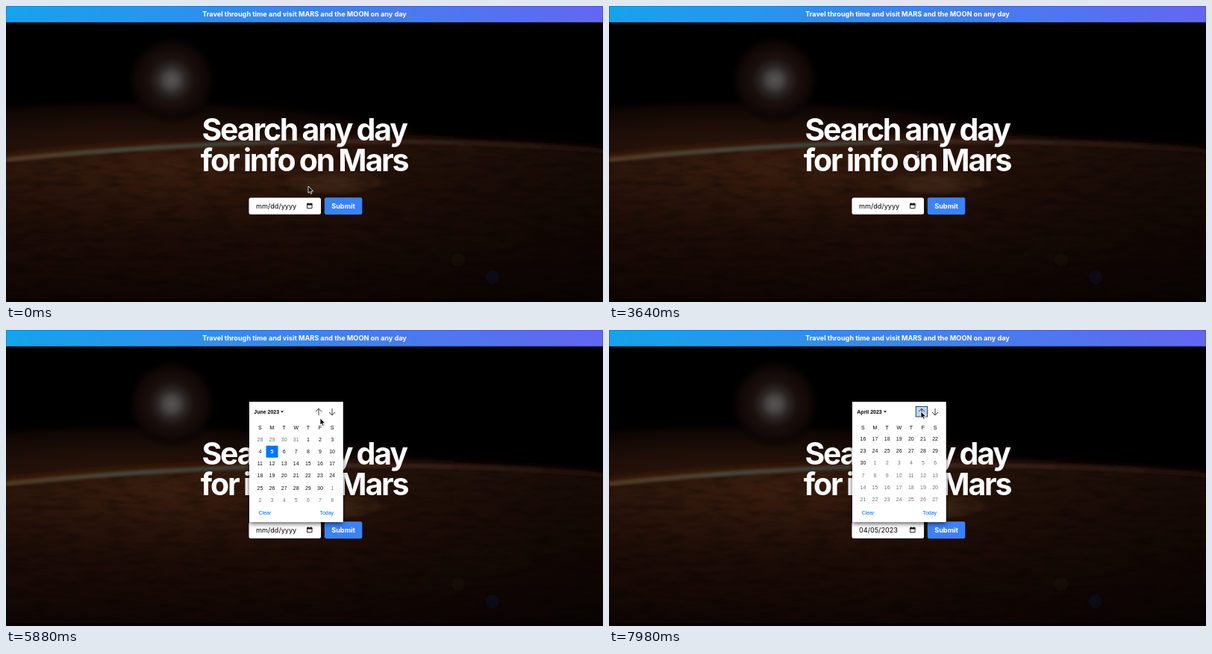
An HTML page that plays this animation: 800x396 px, repeating every 8000 ms.

```html
<!DOCTYPE html>
<html lang="en">
<head>
<meta charset="utf-8">
<title>Search any day</title>
<style>
  html, body { margin: 0; width: 100%; height: 100%; overflow: hidden; background: #000; }
  svg { display: block; width: 100%; height: 100%; }
  text { font-family: Inter, sans-serif; font-size: 9.15px; font-optical-sizing: none; }
  .bold { font-weight: 700; }
  .mid { text-anchor: middle; }
  .title { font-size: 41px; letter-spacing: -.053em; word-spacing: -.03em; fill: #fff; }
  #calendar text { font-family: "Liberation Sans", Arial, sans-serif; font-size: 7px; }
  .link { fill: #0068e0; }
</style>
</head>
<body>
<svg viewBox="0 0 800 396" preserveAspectRatio="none">
  <defs>
    <linearGradient id="bar"><stop stop-color="#15a4ea"/><stop offset="1" stop-color="#6366f1"/></linearGradient>
    <linearGradient id="soil" x2="0" y2="1">
      <stop stop-color="#2b160c"/><stop offset=".3" stop-color="#241008"/>
      <stop offset=".65" stop-color="#1a0b06"/><stop offset="1" stop-color="#100604"/>
    </linearGradient>
    <linearGradient id="side">
      <stop offset=".45" stop-color="#000" stop-opacity="0"/><stop offset="1" stop-color="#000" stop-opacity=".45"/>
    </linearGradient>
    <linearGradient id="rim">
      <stop stop-color="#4f3622"/><stop offset=".2" stop-color="#464538"/>
      <stop offset=".4" stop-color="#3e3d33"/><stop offset=".6" stop-color="#3a2118"/>
      <stop offset="1" stop-color="#1d0c08"/>
    </linearGradient>
    <linearGradient id="glow">
      <stop stop-color="#45220f"/><stop offset=".5" stop-color="#3a1d0f"/><stop offset="1" stop-color="#120604"/>
    </linearGradient>
    <radialGradient id="haze">
      <stop stop-color="#2d160c"/><stop offset=".5" stop-color="#1f0f08"/>
      <stop offset=".85" stop-color="#0e0604"/><stop offset="1" stop-color="#000" stop-opacity="0"/>
    </radialGradient>
    <radialGradient id="light">
      <stop stop-color="#40210f" stop-opacity=".75"/><stop offset="1" stop-color="#2b160c" stop-opacity="0"/>
    </radialGradient>
    <radialGradient id="moon">
      <stop stop-color="#565452"/><stop offset=".16" stop-color="#474443"/>
      <stop offset=".32" stop-color="#2a2523"/><stop offset=".5" stop-color="#1a110e"/>
      <stop offset=".8" stop-color="#0f0705"/><stop offset="1" stop-color="#080302" stop-opacity="0"/>
    </radialGradient>
    <radialGradient id="patch">
      <stop stop-color="#4a301d" stop-opacity=".9"/><stop offset=".75" stop-color="#3c2212" stop-opacity=".65"/>
      <stop offset="1" stop-color="#28130a" stop-opacity="0"/>
    </radialGradient>
    <filter id="grain" x="0" y="0" width="1" height="1">
      <feTurbulence type="fractalNoise" baseFrequency=".03 .12" numOctaves="4" seed="8"/>
      <feColorMatrix values="0 0 0 0 0  0 0 0 0 0  0 0 0 0 0  1.8 0 0 0 -.75"/>
    </filter>
    <filter id="soft"><feGaussianBlur stdDeviation="1.6"/></filter>
    <filter id="wide" y="-1" height="3"><feGaussianBlur stdDeviation="5"/></filter>
    <filter id="shadow" x="-.2" y="-.2" width="1.4" height="1.4">
      <feDropShadow dx="0" dy="2" stdDeviation="3" flood-color="#000" flood-opacity=".65"/>
    </filter>
    <path id="horizon" d="M0 206C150 190 330 181 450 181S680 184 800 194"/>
    <clipPath id="ground"><path d="M0 206C150 190 330 181 450 181S680 184 800 194V396H0z"/></clipPath>
    <clipPath id="weeks"><rect x="327" y="138.3" width="124" height="97"/></clipPath>
  </defs>

  <rect width="800" height="396"/>
  <ellipse cx="170" cy="207" rx="470" ry="86" fill="url(#haze)"/>
  <circle cx="222" cy="99" r="60" fill="url(#moon)"/>
  <use href="#horizon" fill="none" stroke="url(#glow)" stroke-width="12" filter="url(#wide)"/>
  <g clip-path="url(#ground)">
    <rect y="181" width="800" height="215" fill="url(#soil)"/>
    <ellipse cx="230" cy="215" rx="380" ry="95" fill="url(#light)"/>
    <ellipse cx="440" cy="236" rx="78" ry="19" fill="url(#patch)"/>
    <rect y="181" width="800" height="215" filter="url(#grain)" opacity=".35"/>
    <rect y="181" width="800" height="215" fill="url(#side)"/>
  </g>
  <g fill="none" stroke="url(#rim)">
    <use href="#horizon" stroke-width="6" filter="url(#soft)"/>
    <use href="#horizon" opacity=".4"/>
  </g>
  <circle cx="606" cy="340" r="9" fill="#24140e" opacity=".35" filter="url(#soft)"/>
  <circle cx="652" cy="363" r="9" fill="#0b1120" opacity=".6" filter="url(#soft)"/>
  <rect y="392" width="800" height="4" fill="#080101"/>

  <rect width="800" height="22" fill="url(#bar)"/>
  <rect x=".5" y=".5" width="799" height="21" fill="none" stroke="#001030" opacity=".2"/>
  <text class="bold mid" x="400" y="14.3" fill="#fff">Travel through time and visit MARS and the MOON on any day</text>
  <text class="title bold mid" x="399.6" y="180">Search any day</text>
  <text class="title bold mid" x="399.6" y="221.3">for info on Mars</text>

  <rect x="325.5" y="256.5" width="96.5" height="22.3" rx="2.5" fill="#fff"/>
  <text id="field" x="335" y="271.2">mm/dd/yyyy</text>
  <path d="M403.6 264.8h6.4v5.8h-6.4z" fill="none" stroke="#111" stroke-width=".9"/>
  <path d="M403.2 264.2h7.2v2.2h-7.2zM404.3 263.2h1v1h-1zM408.3 263.2h1v1h-1z" fill="#111"/>
  <rect x="426.8" y="256.2" width="50.5" height="22.8" rx="2.5" fill="#3b82f6"/>
  <text class="bold mid" x="452" y="271.2" fill="#fff">Submit</text>

  <g id="calendar">
    <rect x="326" y="96" width="125.7" height="161" fill="#fff" filter="url(#shadow)"/>
    <text id="month" class="bold" x="332.3" y="111.5"></text>
    <path id="caret" d="M-2-1.2h4L0 1.2z"/>
    <rect id="focus" x="411.2" y="102.4" width="15.4" height="13.6" fill="#bcd5f5" stroke="#17294d" stroke-width=".9"/>
    <path d="M419 114.2v-9M415 109.2l4-4 4 4M437 105v9M433 110l4 4 4-4" fill="none" stroke="#222" stroke-width=".9"/>
    <g id="names"></g>
    <g id="days" clip-path="url(#weeks)"></g>
    <text class="link" x="338.6" y="247.4">Clear</text>
    <text class="link" x="420.4" y="247.4">Today</text>
  </g>

  <g id="cursor">
    <path id="arrow" d="M0 0V9.2L2.1 7.3 3.5 10.4 5 9.7 3.7 6.7H6.6z" stroke="#fff" stroke-width=".8" stroke-linejoin="round"/>
    <path id="beam" d="M-2-4.5Q0-4.5 0-3Q0-4.5 2-4.5M0-3V3M-2 4.5Q0 4.5 0 3Q0 4.5 2 4.5M-1.2 1.6H1.2" fill="none" stroke="#777" stroke-width="1"/>
  </g>
</svg>
<script>
const LOOP = 8000, STEP = 70, SCROLL = 320, DAY = 864e5;
const $ = id => document.getElementById(id);
const day = (m, d) => Date.UTC(2023, m - 1, d) / DAY;
const today = day(6, 5);

// Each calendar view: start time, month, first visible Sunday, selected day.
const views = [
  { at: 4760, month: 6, name: 'June', caret: 370, first: day(5, 28), picked: today, value: 'mm/dd/yyyy' },
  { at: 6300, month: 5, name: 'May', caret: 367.3, first: day(4, 30), picked: day(5, 5), value: '05/05/2023' },
  { at: 7910, month: 4, name: 'April', caret: 370, first: day(3, 26), picked: day(4, 5), value: '04/05/2023' }
];

// Pointer stops: time, x, y.
const path = [
  [0, 405, 241], [560, 405, 241], [1190, 410, 257], [2450, 410, 257],
  [3290, 414, 199], [3780, 414, 199], [4480, 408, 265], [5250, 408, 265],
  [5880, 421, 118], [6090, 418, 109], [LOOP, 418, 109]
];

const colX = i => 340.4 + i * 16.12;
const label = (x, y, text, attrs = '') =>
  `<text class="mid" x="${x}" y="${y + 2.5}" ${attrs}>${text}</text>`;
const box = (x, y, attrs) =>
  `<rect x="${x - 8}" y="${y - 8}" width="16" height="16" ${attrs}/>`;

$('names').innerHTML = [...'SMTWTFS'].map((c, i) => label(colX(i), 130.2, c)).join('');

function drawDays(view, first) {
  const weekday = view.first % 7;
  const top = (first - weekday) / 7;
  let out = '';
  for (let row = Math.floor(top) - 1; row < top + 7; row++) {
    const y = 146.6 + (row - top) * 16.1;
    for (let col = 0; col < 7; col++) {
      const n = row * 7 + weekday + col, x = colX(col);
      const date = new Date(n * DAY);
      const inMonth = date.getUTCMonth() + 1 === view.month;
      const picked = n === view.picked;
      if (picked) out += box(x, y, 'fill="#0075ff" rx="1"');
      else if (n === today) out += box(x, y, 'fill="none" stroke="#777" stroke-width=".8" rx="1"');
      const color = picked ? '#fff' : inMonth ? '#111' : '#757575';
      out += label(x, y, date.getUTCDate(), `fill="${color}" font-weight="${picked ? 700 : 400}"`);
    }
  }
  $('days').innerHTML = out;
}

function drawCalendar(t) {
  const index = views.filter(v => t >= v.at).length - 1;
  const view = views[index];
  $('calendar').style.display = view ? '' : 'none';
  $('field').textContent = view ? view.value : 'mm/dd/yyyy';
  if (!view) return;
  const from = index ? views[index - 1].first : view.first;
  const p = Math.min(1, (t - view.at) / SCROLL);
  const eased = 1 - (1 - p) ** 2;
  $('month').textContent = view.name + ' 2023';
  $('caret').setAttribute('transform', `translate(${view.caret} 109.4)`);
  $('focus').style.display = index ? '' : 'none';
  drawDays(view, from + (view.first - from) * eased);
}

function drawCursor(t) {
  const i = path.findIndex(([at]) => at > t);
  const [t0, x0, y0] = path[i - 1], [t1, x1, y1] = path[i];
  const p = (t - t0) / (t1 - t0), e = p * p * (3 - 2 * p);
  const x = x0 + (x1 - x0) * e, y = y0 + (y1 - y0) * e;
  const overTitle = t < views[0].at && y > 146 && y < 230;
  $('cursor').setAttribute('transform', `translate(${x} ${y})`);
  $('arrow').style.display = overTitle ? 'none' : '';
  $('beam').style.display = overTitle ? '' : 'none';
}

let last = -1;
const origin = performance.now();
function tick() {
  const now = Math.max(0, performance.now() - origin) % LOOP;
  const t = Math.floor(now / STEP) * STEP;
  if (t !== last) {
    last = t;
    drawCalendar(t);
    drawCursor(t);
  }
  requestAnimationFrame(tick);
}
tick();
</script>
</body>
</html>
```
